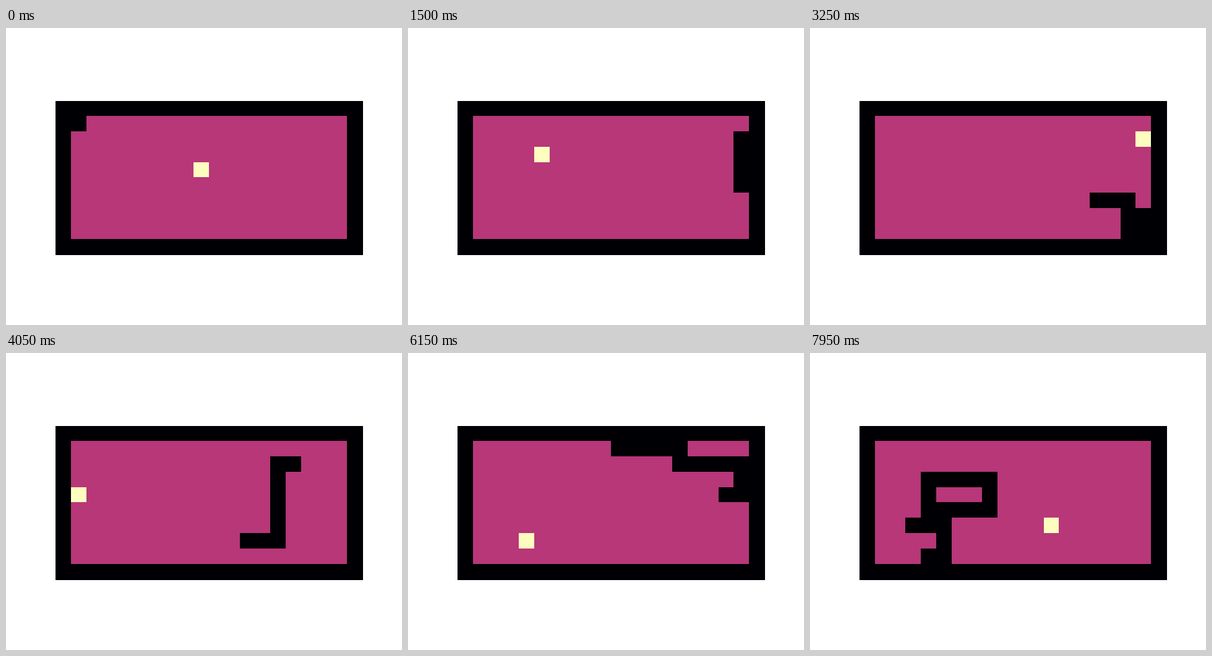
Recreate the animation shown at these times as an HTML page with a canvas. Size 640 by 480 pixels, loop 8 s.

```html
<!DOCTYPE html>
<html lang="en">
<head>
<meta charset="utf-8">
<title>Snake</title>
<style>
  html, body { margin: 0; width: 100%; height: 100%; overflow: hidden; background: #fff; }
  canvas { display: block; }
</style>
</head>
<body>
<canvas id="stage" width="640" height="480"></canvas>
<script>
const ctx = document.getElementById('stage').getContext('2d');
const STEP_MS = 50, STEPS = 160, CELL = 24.8;
const WALL = '#000004', FLOOR = '#b73779', FOOD = '#fcfdbf';

// Meals in the order they appear, as [column, row].
const meals = [
  [9, 4], [8, 7], [18, 2], [5, 3], [4, 6], [17, 8],
  [18, 2], [14, 7], [1, 4], [5, 4], [18, 2], [14, 1],
  [4, 7], [1, 8], [5, 5], [8, 3], [4, 6], [12, 6]
];

const same = (a, b) => a[0] === b[0] && a[1] === b[1];

// The snake seeks each meal sideways first, then vertically, and turns away from its body.
function nextCell([x, y], [mx, my], body) {
  const dx = Math.sign(mx - x);
  if (!dx) return [x, y + Math.sign(my - y)];
  const ahead = [x + dx, y];
  return body.some(c => same(c, ahead)) ? [x - dx, y] : ahead;
}

function play() {
  const states = [];
  let body = [[1, 1]], eaten = 0;
  for (let i = 0; i < STEPS; i++) {
    states.push({ body, meal: meals[eaten] });
    const head = nextCell(body[0], meals[eaten], body);
    const ate = same(head, meals[eaten]);
    body = [head, ...(ate ? body : body.slice(0, -1))];
    if (ate) eaten++;
  }
  return states;
}

const edgeX = col => Math.round(80 + CELL * col);
const edgeY = row => Math.round(117.4 + CELL * row);

function fillCells(color, col, row, cols = 1, rows = 1) {
  const x = edgeX(col), y = edgeY(row);
  ctx.fillStyle = color;
  ctx.fillRect(x, y, edgeX(col + cols) - x, edgeY(row + rows) - y);
}

function draw({ body, meal }) {
  ctx.fillStyle = '#fff';
  ctx.fillRect(0, 0, 640, 480);
  ctx.fillStyle = WALL;
  ctx.fillRect(80, 118, 497, 249);
  fillCells(FLOOR, 1, 1, 18, 8);
  fillCells(FOOD, ...meal);
  body.forEach(cell => fillCells(WALL, ...cell));
}

const states = play();
const start = performance.now();

function tick() {
  const elapsed = performance.now() - start;
  draw(states[Math.floor((elapsed + 0.5) / STEP_MS) % STEPS]);
  requestAnimationFrame(tick);
}
tick();
</script>
</body>
</html>
```
